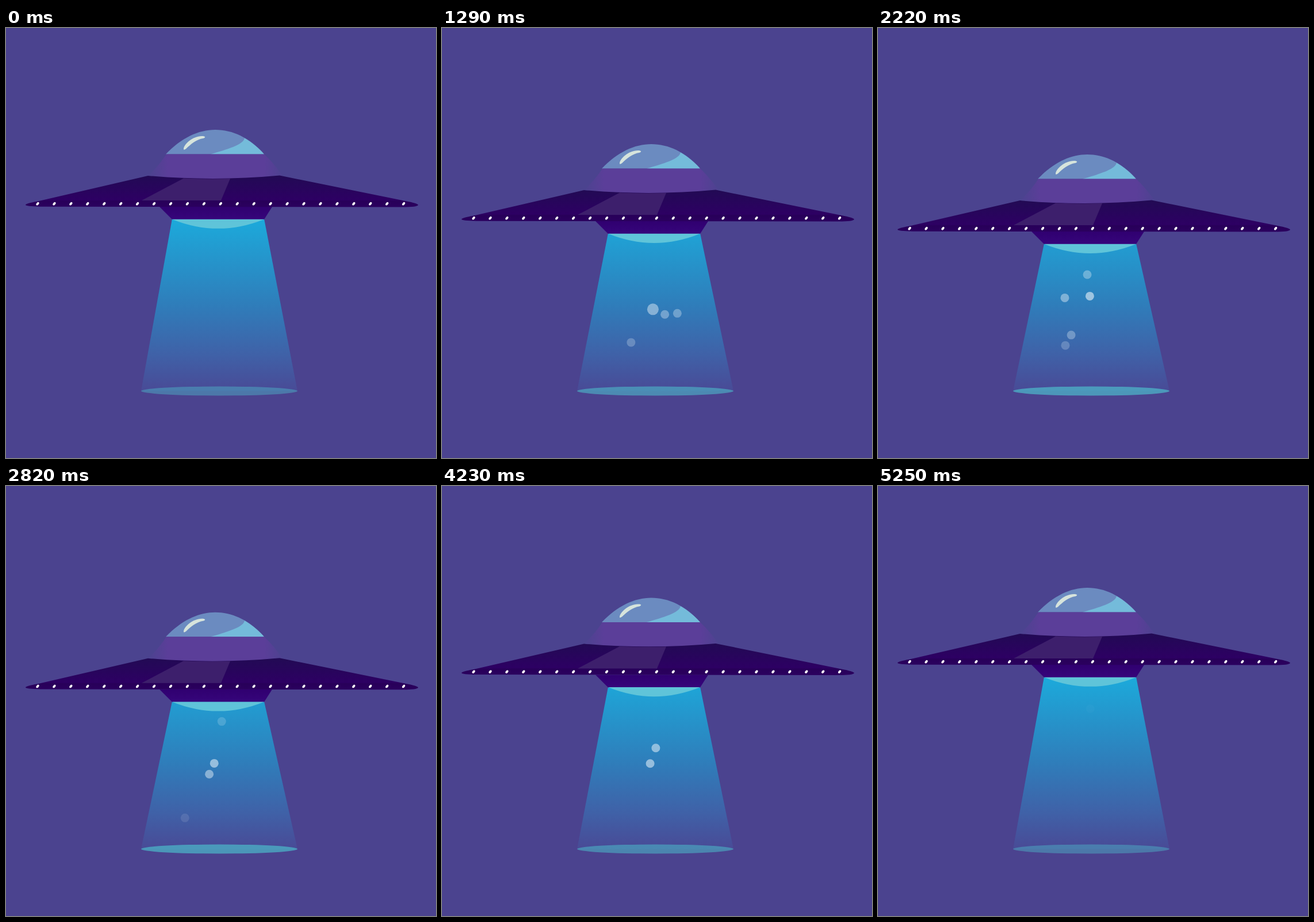
Recreate the animation shown at these times as an HTML page. Size 748x748 px, loop 5.28 s.

```html
<!DOCTYPE html>
<html lang="en">
<head>
<meta charset="utf-8">
<title>Flying saucer</title>
<style>
  html, body { margin: 0; width: 100%; height: 100%; overflow: hidden; background: #4b438f; }
  svg { display: block; width: 100%; height: 100%; }
</style>
</head>
<body>
<svg viewBox="0 0 748 748">
  <defs>
    <linearGradient id="beamFill" gradientUnits="userSpaceOnUse" x1="0" y1="332" x2="0" y2="632">
      <stop offset="0" stop-color="#1caadb"/>
      <stop offset=".5" stop-color="#2f7dba"/>
      <stop offset=".78" stop-color="#3f62a8"/>
      <stop offset="1" stop-color="#494a96"/>
    </linearGradient>
    <linearGradient id="collarFill" gradientUnits="userSpaceOnUse" x1="250" y1="0" x2="482" y2="0">
      <stop offset="0" stop-color="#5b3e99" stop-opacity=".1"/>
      <stop offset=".14" stop-color="#5b3e99"/>
      <stop offset=".86" stop-color="#5b3e99"/>
      <stop offset="1" stop-color="#5b3e99" stop-opacity=".1"/>
    </linearGradient>
    <linearGradient id="discFill" gradientUnits="userSpaceOnUse" x1="0" y1="257" x2="0" y2="312">
      <stop offset="0" stop-color="#220a54"/>
      <stop offset=".76" stop-color="#2d0063"/>
      <stop offset=".8" stop-color="#280059"/>
      <stop offset="1" stop-color="#2b005f"/>
    </linearGradient>
    <linearGradient id="baseFill" x1="0" y1="0" x2="0" y2="1">
      <stop offset="0" stop-color="#300070"/>
      <stop offset="1" stop-color="#36057b"/>
    </linearGradient>
  </defs>
  <rect width="748" height="748" fill="#4b438f"/>
  <path id="beam" fill="url(#beamFill)"/>
  <g id="bubbles" fill="#eaf2f9"></g>
  <ellipse id="pool" cx="371" cy="631.5" rx="136" ry="8" fill="#4cc1ce"/>
  <g id="ship">
    <path fill="#6b8bc0" d="M278 219.5C305 191 335 177 364 177C394 177 424 191 449 219.5Z"/>
    <path fill="#74bbda" d="M415 191.5C413 203 385 211 356 219.5H449C440 209 428 199 415 191.5Z"/>
    <path fill="#d6e4dc" d="M309 210.5C309 202 327 186 344 188.2Q348.500 189.500 344 191.800C330 194 322 202 313 210.200Q309 213 309 210.5Z"/>
    <path fill="url(#collarFill)" d="M279 219.5H449Q465 234 481 257L476 256.5Q362 268 247 257Q265 241 279 219.5Z"/>
    <path fill="url(#baseFill)" d="M267 311H463L449 333H289Z"/>
    <path fill="url(#discFill)" d="M247 257Q362 267 476 256.5L700 302Q717 305.500 717 308Q715 311.5 690 311.5L60 310.7Q34 310.200 34 307.5Q35 305 55 301.5Z"/>
    <path fill="#3d1f6c" d="M309 261.5Q350 263 390 262L374 300H236Z"/>
    <path fill="#5fc4d9" d="M289 332.7H449Q369 365 289 332.7Z"/>
    <g id="lights" fill="#fff"></g>
  </g>
</svg>
<script>
const LOOP = 5280, STEP = 30;
const RISE_END = 2500, CYCLE_END = 5200, DROP = 48.5;
const byId = id => document.getElementById(id);

function make(tag, attrs, parent) {
  const el = document.createElementNS('http://www.w3.org/2000/svg', tag);
  for (const key in attrs) el.setAttribute(key, attrs[key]);
  if (parent) parent.append(el);
  return el;
}

for (let i = 0; i < 23; i++) {
  const x = 55 + i * 28.94;
  make('ellipse', { cx: x, cy: 305.7, rx: 3.2, ry: 2, transform: `rotate(-50 ${x} 305.7)` }, byId('lights'));
}

const trail = 'M296 602Q312 577 326 552Q334 538 340 527Q353 504 362 483Q370 464 374 448Q377 436 377 428Q377 408 368 384';
const bubble = (start, life, d, peak = 0.6, r = 7.5, shrink = 0) => {
  const path = make('path', { d });
  return { start, life, path, peak, r, shrink, length: path.getTotalLength(), dot: make('circle', {}, byId('bubbles')) };
};

const bubbles = [
  ...[626, 1404, 1618, 2520, 2818].map(start => bubble(start, 2470, trail)),
  bubble(100, 2080, 'M352 605Q357 588 359 568Q364 528 367 488Q368 445 366 402', 0.5, 11.5, 2.6),
  bubble(310, 2450, 'M459 535Q453 531 447 528Q411 513 384 496Q364 478 364 434Q364 410 368 385', 0.55),
  bubble(500, 2300, 'M470 540Q445 512 411 497Q365 478 323 469C305 465 300 445 305 425')
];

function hover(t) {
  if (t < RISE_END) return DROP * t / RISE_END;
  return DROP * Math.max(0, (CYCLE_END - t) / (CYCLE_END - RISE_END));
}

function drawBubble(b, t) {
  const u = (t - b.start) / b.life;
  const alive = u > 0 && u < 1;
  b.dot.setAttribute('opacity', alive ? b.peak * Math.min(1, u / 0.62, (1 - u) / 0.35) : 0);
  if (!alive) return;
  const p = b.path.getPointAtLength(u * b.length);
  b.dot.setAttribute('cx', p.x);
  b.dot.setAttribute('cy', p.y);
  b.dot.setAttribute('r', b.r - b.shrink * u);
}

function draw(t) {
  const y = hover(t);
  byId('ship').setAttribute('transform', `translate(0 ${y})`);
  byId('beam').setAttribute('d', `M289 ${332 + y}H449L507 631.5H235Z`);
  byId('pool').setAttribute('opacity', 0.42 + 0.28 * y / DROP);
  bubbles.forEach(b => drawBubble(b, t));
}

const origin = performance.now();
function tick() {
  const t = (performance.now() - origin) % LOOP;
  draw(Math.floor(t / STEP) * STEP);
  requestAnimationFrame(tick);
}
tick();
</script>
</body>
</html>
```
